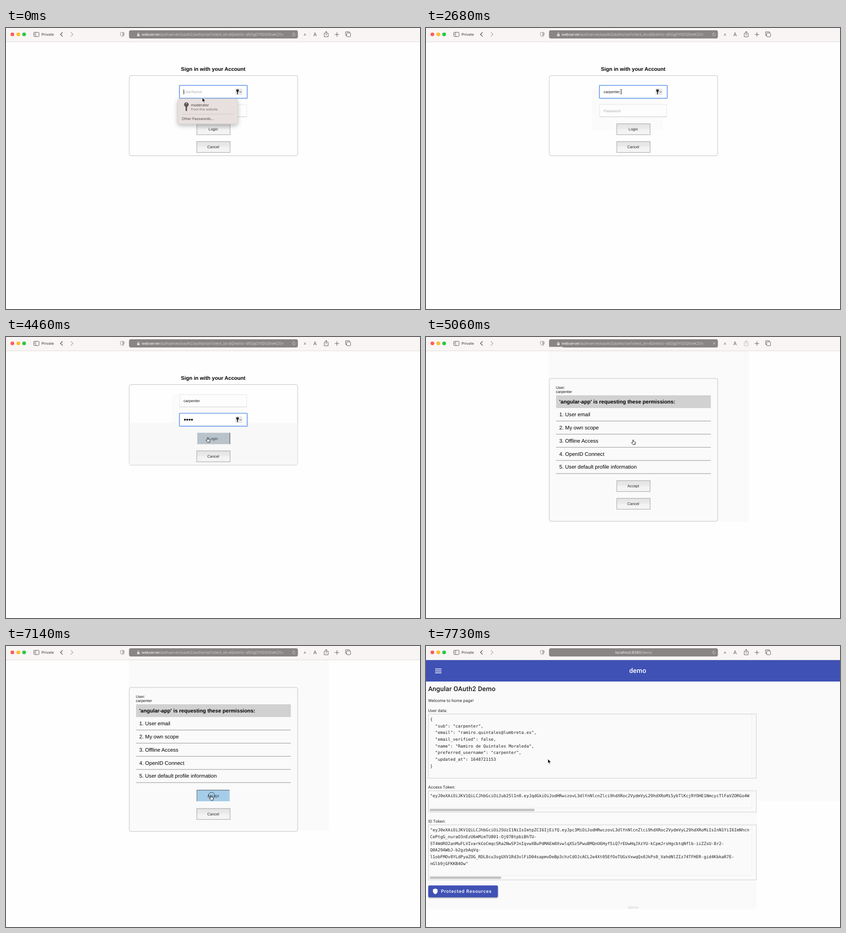
Recreate the animation shown at these times as an HTML page. Size 907 by 617 pixels, loop 8 s.

```html
<!DOCTYPE html>
<html lang="en">
<head>
<meta charset="utf-8">
<title>Sign-in flow</title>
<style>
html, body { margin: 0; width: 100%; height: 100%; overflow: hidden; background: #fefefe; }
svg { display: block; }
text { white-space: pre; text-rendering: geometricPrecision; }
.ui { font-family: Inter, "Liberation Sans", sans-serif; }
.web { font-family: "Liberation Sans", Arial, sans-serif; }
.app { font-family: Roboto, "Liberation Sans", sans-serif; }
.code { font-family: "DejaVu Sans Mono", "Liberation Mono", monospace; }
</style>
</head>
<body>
<svg id="stage" width="907" height="617" viewBox="0 0 907 617"></svg>
<script>
const LOOP = 8000;
const USER = "carpenter", SAVED = "moderator";

// Each step overrides part of the state from its time (ms) onward.
const STEPS = [
  [0, { page: "login", typed: 0, dots: 0, caret: 1, popup: 1, focus: 0, hover: 0, load: 0, cur: "arrow", x: 430, y: 153 }],
  [150, { cur: "beam", x: 429, y: 147 }],
  [300, { x: 428, y: 141 }],
  [450, { x: 427, y: 137 }],
  [600, { y: 139 }],
  [750, { x: 427.5, y: 140, caret: 0 }],
  [1200, { caret: 1 }],
  [1650, { typed: 1, popup: 0, ghost: 1 }],
  [1800, { typed: 2 }],
  [1950, { typed: 3 }],
  [2100, { typed: 4 }],
  [2240, { typed: 6 }],
  [2390, { typed: 7 }],
  [2540, { typed: 8 }],
  [2680, { typed: 9, caret: 0 }],
  [2980, { focus: 1, caret: 1, popup: 2 }],
  [3270, { dots: 1, popup: 0 }],
  [3420, { dots: 3 }],
  [3570, { dots: 4, caret: 0 }],
  [4170, { x: 432, y: 168 }],
  [4320, { cur: "arrow", x: 438, y: 199 }],
  [4460, { cur: "hand", x: 443, y: 226, hover: 1, ghost: 2 }],
  [4610, { hover: 2, ring: 1 }],
  [4760, { ring: 0, load: 8 }],
  [4910, { x: 449, y: 229, load: 20 }],
  [5060, { page: "consent", x: 455, y: 231, hover: 0, load: 30 }],
  [5210, { load: 0, tail: 1 }],
  [5350, { tail: 0 }],
  [5500, { cur: "arrow", x: 452, y: 232 }],
  [5650, { x: 451, y: 245 }],
  [5800, { x: 450, y: 264 }],
  [5940, { x: 449, y: 286 }],
  [6090, { x: 449, y: 304 }],
  [6240, { cur: "hand", x: 450, y: 326, hover: 1 }],
  [6390, { x: 451, y: 334, hover: 2 }],
  [6540, { x: 450.5, y: 333.5 }],
  [7140, { ring: 1 }],
  [7280, { ring: 0, load: 30 }],
  [7430, { page: "blank", cur: "arrow", x: 447, y: 328, load: 216 }],
  [7580, { page: "home", x: 372, y: 292, load: 0 }],
  [7730, { x: 267, y: 248 }]
];

const states = [];
STEPS.reduce((s, [at, change]) => {
  const next = { ...s, ...change };
  states.push({ at, ...next });
  return next;
}, {});

const rect = (x, y, w, h, fill, more = "") =>
  `<rect x="${x}" y="${y}" width="${w}" height="${h}" fill="${fill}" ${more}/>`;
const line = (d, color, w = 1, more = "") =>
  `<path d="${d}" fill="none" stroke="${color}" stroke-width="${w}" ${more}/>`;
const shape = (d, fill, more = "") => `<path d="${d}" fill="${fill}" ${more}/>`;
const dot = (x, y, r, fill) => `<circle cx="${x}" cy="${y}" r="${r}" fill="${fill}"/>`;
const text = (cls, size, x, y, str, fill = "#111", more = "") =>
  `<text class="${cls}" font-size="${size}" x="${x}" y="${y}" fill="${fill}" ${more}>${str}</text>`;
const at = (x, y, body) => `<g transform="translate(${x} ${y})">${body}</g>`;
const MID = 'text-anchor="middle"', BOLD = 'font-weight="700"', ROUND = 'stroke-linecap="round" stroke-linejoin="round"';

const DEFS = `<defs>
<linearGradient id="btn" x2="0" y2="1"><stop offset="0" stop-color="#e3e3e3"/><stop offset=".48" stop-color="#ebebeb"/>
<stop offset=".5" stop-color="#f2f2f2"/><stop offset="1" stop-color="#f5f5f5"/></linearGradient>
<linearGradient id="fade" gradientUnits="userSpaceOnUse" x1="598" x2="620"><stop stop-color="#fff"/><stop offset="1" stop-color="#fff" stop-opacity="0"/></linearGradient>
<mask id="urlMask"><rect x="270" y="5" width="352" height="18" fill="url(#fade)"/></mask>
<clipPath id="barClip"><rect x="269.5" y="5" width="370" height="18" rx="4"/></clipPath>
<clipPath id="codeClip"><rect x="6" y="150" width="707.5" height="363"/></clipPath>
<filter id="soft" x="-20%" y="-30%" width="140%" height="170%"><feDropShadow dx="0" dy="4" stdDeviation="5" flood-opacity=".25"/></filter>
<filter id="lift" x="-10%" y="-20%" width="120%" height="160%"><feDropShadow dx="0" dy="1.5" stdDeviation="1.3" flood-opacity=".4"/></filter>
</defs>`;

const shield = (fill) => shape("M0 -5 L4.2 -3.5 V0 Q4.2 3.5 0 5.3 Q-4.2 3.5 -4.2 0 V-3.5Z", fill);

function key(x, y, k, color, hole) {
  return `<g transform="translate(${x} ${y}) scale(${k})">` + dot(0, -4.6, 4.8, color) + dot(0, -6.8, 1.1, hole) +
    shape("M-1.8 -1 H1.8 V1.5 L.8 2.7 2 4 .8 5.2 2 6.6 0 9.6 -1.8 7.8Z", color) + "</g>";
}

function address(s) {
  const remote = s.page === "login" || s.page === "consent";
  if (s.page === "home")
    return text("ui", 8, 455, 17.4, 'localhost:8080<tspan fill="#cfcdcc">/demo</tspan>', "#f4f3f3", MID);
  const [host, rest] = remote
    ? ["webserver", "/authserver/oauth2/authorize?client_id=dQnkkVc-d5GgDY5DQ5heKZ0e"]
    : ["localhost:8080", "/demo?code=yRWnqA1DC0z4XEiR29Bqef9HuwDmGMIRbdxKHDazIpr"];
  const lock = remote
    ? rect(287.3, 13.6, 5.4, 4.4, "#e0dfde", 'rx=".8"') + line("M288.5 14 V12.2 a1.5 1.6 0 0 1 3 0 V14", "#e0dfde", .9) : "";
  return lock + `<g mask="url(#urlMask)">` +
    text("ui", 8, remote ? 297 : 288, 17.4, `${host}<tspan fill="#cfcdcc">${rest}</tspan>`, "#fff") + "</g>";
}

function toolbar(s) {
  const ink = "#5d5b5a", busy = s.load > 0;
  const bar = busy ? s.load : s.tail ? 369 : 0;
  return rect(0, 0, 907, 30.5, "#f8f5f4") + rect(0, 30, 907, 1, "#dfdcdb") +
    dot(14, 14, 4.1, "#fe5f57") + dot(27, 14, 4.1, "#febc2e") + dot(39.7, 14, 4.1, "#28c840") +
    rect(60.8, 9.4, 11.6, 9.4, "none", `rx="1.6" stroke="${ink}"`) +
    line("M65 9.4 V18.8 M62.3 11.7 H63.6 M62.3 13.5 H63.6 M62.3 15.3 H63.6", ink, .8) +
    text("ui", 8, 77.7, 17.2, "Private", "#646261", 'font-weight="600"') +
    line("M123.7 9.6 L119.3 14 L123.7 18.4", "#4c4a49", 1.3, ROUND) +
    line("M142.3 9.6 L146.7 14 L142.3 18.4", "#aaa7a6", 1.2, ROUND) +
    at(254.8, 14, line("M0 -5 L4.2 -3.6 V0 Q4.2 3.4 0 5 Q-4.2 3.4 -4.2 0 V-3.6Z", "#8b8988", .9) +
      shape("M0 -5 L4.2 -3.6 V0 Q4.2 3.4 0 5Z", "#b5b2b1")) +
    rect(269.5, 5, 370, 18, "#888584", 'rx="4"') + address(s) +
    `<g clip-path="url(#barClip)">${rect(269.5, 21.6, bar, 1.4, "#f3f2f2")}</g>` +
    (busy ? line("M628.7 11.8 L633.3 16.4 M633.3 11.8 L628.7 16.4", "#d9d7d6", .9)
      : line("M633.7 13.6 A2.9 2.9 0 1 1 631 11.5 M630 9.8 L631.7 11.5 L630 13.2", "#d0cecd", .9)) +
    text("ui", 7, 655, 17, "A", ink, MID) + rect(665.5, 10, .6, 9, "#e7e4e3") +
    text("ui", 11, 677, 18, "A", ink, MID) +
    line("M699.4 11.6 H697.2 V19.3 H705.8 V11.6 H703.6 M701.5 15.8 V7.6 M699 10 L701.5 7.5 L704 10", busy ? "#bfbcbb" : ink, 1, ROUND) +
    line("M725 9.8 V18.6 M720.6 14.2 H729.4", ink, 1.1, ROUND) +
    line("M746.2 16.5 H744 V8.3 H752.4 V10.6", ink, 1, ROUND) +
    rect(746.4, 10.8, 8.4, 8.4, "none", `rx="1.3" stroke="${ink}"`);
}

function button(label, y, hover = 0) {
  if (!hover)
    return rect(418, y, 73, 24, "url(#btn)", 'stroke="#a5a5a5" stroke-width="1.1"') +
      text("web", 8.35, 454, y + 14.8, label, "#222", MID);
  const mid = hover === 1;
  return rect(mid ? 419 : 418, y, 72, 25, mid ? "#b8c3cb" : "#a5cde9") +
    (mid ? line(`M490.5 ${y} V${y + 25}`, "#555", 1.2) : line(`M418.3 ${y + 25} V${y + .5} H490`, "#6b7780", 1.3)) +
    text("web", 8.35, 454, y + 15.6, label, "#35424b", MID);
}

function field(y, active, value, hint, caretX) {
  const label = text("web", 8.3, 389, y + 17, value || hint, value ? "#111" : "#adadad", 'letter-spacing=".1"');
  if (!active)
    return rect(380.5, y + .5, 147, 27, "#fdfdfd", 'stroke="#e6e6e6"') + rect(380, y + 27, 148, 1, "#cfcfcf") + label;
  return rect(380, y, 148.5, 28.4, "#fff", 'rx="1" stroke="#82abee" stroke-width="2.2"') + label +
    rect(502, y + 6.5, 16, 15, "#e9e9e9", 'rx="3.5"') + key(507.3, y + 14, .6, "#222", "#e9e9e9") +
    line(`M511.7 ${y + 13.4} l2 2 l2 -2`, "#333", 1, ROUND) +
    (caretX ? rect(caretX, y + 9, 1, 10.5, "#111") : "");
}

function popup(kind) {
  if (!kind) return "";
  const box = (y, w, h) => rect(375.8, y, w, h, "#e7e0de", 'rx="6" stroke="#c6c0be" stroke-width=".7" filter="url(#soft)"');
  const other = (y) => text("ui", 7.9, 385, y, "Other Passwords...", "#4a4645");
  if (kind === 2) return box(197, 110, 37) + other(218.5);
  return box(155.3, 132, 55.5) + key(395.2, 173, 1.05, "#5f5957", "#e7e0de") +
    text("ui", 8, 405.3, 171.7, SAVED, "#454140") +
    text("ui", 7, 405.3, 181, "From this website", "#6f6967") +
    rect(385, 188.8, 114, .8, "#cbc4c2") + other(202.2);
}

function frame(y, h, fill) {
  return rect(270, y, 369, h, fill, 'rx="4" stroke="#bfbfbf"');
}

function login(s) {
  const name = USER.slice(0, s.typed), drop = s.hover ? .7 : 0;
  const nameEnd = 389 + s.typed * 4.15;
  let out = text("web", 11.5, 454, 94.2, "Sign in with your Account", "#000", BOLD + " " + MID) +
    frame(104.5, 176 + drop, "#fefefe");
  if (s.ghost) out += rect(364, s.ghost > 1 ? 125 : 135, 155, 90, "#fbfbfb");
  if (s.ghost > 1) out += rect(270.5, 188, 368, 92.5, "#f8f8f8");
  out += field(126, !s.focus, name, "UserName", s.caret && nameEnd) +
    field(167.5, s.focus, s.dots ? " " : "", "Password", s.caret && 389 + s.dots * 5);
  for (let i = 0; i < s.dots; i++) out += dot(392 + i * 5.1, 181.6, 2.15, "#111");
  return out + button("Login", 210.3, s.hover) + button("Cancel", 249.3 + drop) + popup(s.popup);
}

function consent(s) {
  const drop = s.hover ? 2.6 : 0;
  const scopes = ["User email", "My own scope", "Offline Access", "OpenID Connect", "User default profile information"];
  return rect(269, 31, 438, 374, "#fafafa") + frame(91, 313.6 + drop, "#fafafa") +
    text("web", 8.4, 284.5, 113.6, "User:") + text("web", 8.4, 284.5, 123, USER) +
    rect(285, 128, 339, 28, "#d1d1d1") +
    text("web", 11.5, 292, 146, "'angular-app' is requesting these permissions:", "#000", BOLD) +
    scopes.map((name, i) => text("web", 11.53, 292, 174.2 + i * 28.8, `${i + 1}. ${name}`, "#000") +
      rect(285, 184 + i * 28.85, 339, 1, "#8f8f8f")).join("") +
    button("Accept", s.hover ? 316 : 315.3, s.hover) + button("Cancel", 354.2 + drop);
}

function header() {
  return rect(0, 30.6, 907, 47.4, "#3f51b5") +
    [49.7, 53.9, 58.1].map(y => rect(20, y, 14, 1.6, "#fff")).join("") +
    text("app", 14.5, 464, 59.2, "demo", "#fff", MID + ' font-weight="500" letter-spacing=".18"');
}

const footer = (y) => text("app", 8.9, 454, y, "demo", "#cfcfcf", MID + ' letter-spacing=".2"');

function blank() {
  return rect(0, 78, 907, 262, "#fafafa") + rect(640, 340, 67, 65, "#fafafa") + header() + footer(103.2);
}

const PROFILE = [
  '{',
  `  "sub": "${USER}",`,
  '  "email": "ramiro.quintales@lumbreta.es",',
  '  "email_verified": false,',
  '  "name": "Ramiro de Quintales Moraleda",',
  `  "preferred_username": "${USER}",`,
  '  "updated_at": 1648721153',
  '}'
];
const ACCESS = ['"eyJ0eXAiOiJKV1QiLCJhbGciOiJub25lIn0.eyJqdGkiOiJodHRwczovL3dlYnNlcnZlci9hdXRoc2VydmVyL29hdXRoMi5ybTlKcjRYOHE1NmcycTlFaVZORGo4W'];
const ID = [
  '"eyJ0eXAiOiJKV1QiLCJhbGciOiJSUzI1NiIsImtpZCI6IjEifQ.eyJpc3MiOiJodHRwczovL3dlYnNlcnZlci9hdXRoc2VydmVyL29hdXRoMiIsInN1YiI6ImNhcn',
  'CePtgG_nuraO3nEzU6mMimTU801-Oj07BtpbiBhTU-',
  'ST4WdRO2anMuFLVIvarkCoCmqcSRa2NwSPJnIqvwXBuPdMAEm0XvwlqXSz5PwuBMQnU6Hyf5iQ7rEUwHqJXzYU-kCpmJrsHgcbtqNflb-iiZZsU-8r2-',
  'Q0A29AWbJ-b2gzbAqVq-',
  'l1obFMOv8YLdPyaZOG_RDL8cu3sgUXV1Rd3vlFiD04sapmvDeBp3chzCdOJcACL2e4Xt05EfOoTUGsVxwqQx0JkPs0_VahdNlZIz74TFHER-gid4KbkaR7E-',
  'nGlb9jGFKKB4Ow"'
];

function panel(label, y, h, lines, thumb) {
  const end = y + h;
  return text("app", 8.95, 4.8, y - 4.7, label, "#222", 'letter-spacing=".16"') +
    rect(5.5, y, 718, h, "#fafafa", 'stroke="#cdcdcd"') +
    rect(713.5, y + .5, .8, h - (thumb ? 10 : 1), "#ececec") +
    (thumb ? rect(6, end - 9.8, 708, .8, "#ececec") + rect(8, end - 7.3, thumb, 5, "#c1c1c1", 'rx="2.5"') : "") +
    `<g clip-path="url(#codeClip)">` +
    lines.map((str, i) => text("code", 9.235, 9, y + 14.4 + i * 14.7, str, "#222")).join("") + "</g>";
}

function home() {
  return rect(0, 78, 907, 262, "#fafafa") + rect(3, 340, 721, 237, "#fafafa") + header() +
    text("app", 14.5, 4.8, 98.6, "Angular OAuth2 Demo", "#1c1c1c", 'font-weight="500" letter-spacing=".18"') +
    text("app", 8.95, 4.8, 122.5, "Welcome to home page!", "#222", 'letter-spacing=".16"') +
    panel("User data:", 149.5, 140.8, PROFILE) +
    panel("Access Token:", 318, 46.8, ACCESS, 230) +
    panel("ID Token:", 392.8, 120.8, ID, 157) +
    rect(5, 525.7, 152.5, 26, "#3f51b5", 'rx="3" filter="url(#lift)"') +
    at(20.3, 538.6, `<g transform="scale(1.2)">${shield("#fff")}</g>`) +
    text("app", 10.1, 32.7, 542.3, "Protected Resources", "#fff", 'font-weight="500" letter-spacing=".9"') +
    footer(576.7);
}

const CURSORS = {
  arrow: shape("M0 0 V9.6 L2.2 7.6 L3.8 11.2 L5.4 10.5 L3.9 7 H6.8Z", "#000", 'stroke="#fff" stroke-width=".8"'),
  beam: line("M-2 -5 q2 0 2 1.2 v7.6 q0 1.2 -2 1.2 M2 -5 q-2 0 -2 1.2 M0 3.8 q0 1.2 2 1.2 M-1 .8 H1", "#111", .9),
  hand: shape("M-1.9 -5 q.9 -.6 1.4 .3 l.3 3.6 q1 -.7 1.6 .2 q1 -.5 1.5 .4 q1.2 -.3 1.3 .9 l-.2 2.6 -1 2.3 h-4.6 l-3 -3.8 q-.4 -1.3 .9 -1.2 l1.3 1z",
    "#fff", 'stroke="#111" stroke-width=".9" stroke-linejoin="round"') + line("M.1 1.8 V3.8 M1.5 1.8 V3.8 M2.8 1.8 V3.8", "#333", .5)
};

function cursor(s) {
  const ring = s.ring ? `<circle cy="-5" r="7.2" fill="none" stroke="#333" stroke-width=".9"/>` : "";
  return at(s.x, s.y, ring + CURSORS[s.cur]);
}

const PAGES = { login, consent, blank, home };
const stage = document.getElementById("stage");
const start = performance.now();
let shown = null;

function tick() {
  const t = (performance.now() - start) % LOOP;
  const s = states.findLast(step => step.at <= t) || states[0];
  if (s !== shown) {
    stage.innerHTML = DEFS + rect(0, 0, 907, 617, "#fefefe") + PAGES[s.page](s) + toolbar(s) + cursor(s);
    shown = s;
  }
  requestAnimationFrame(tick);
}
tick();
</script>
</body>
</html>
```
